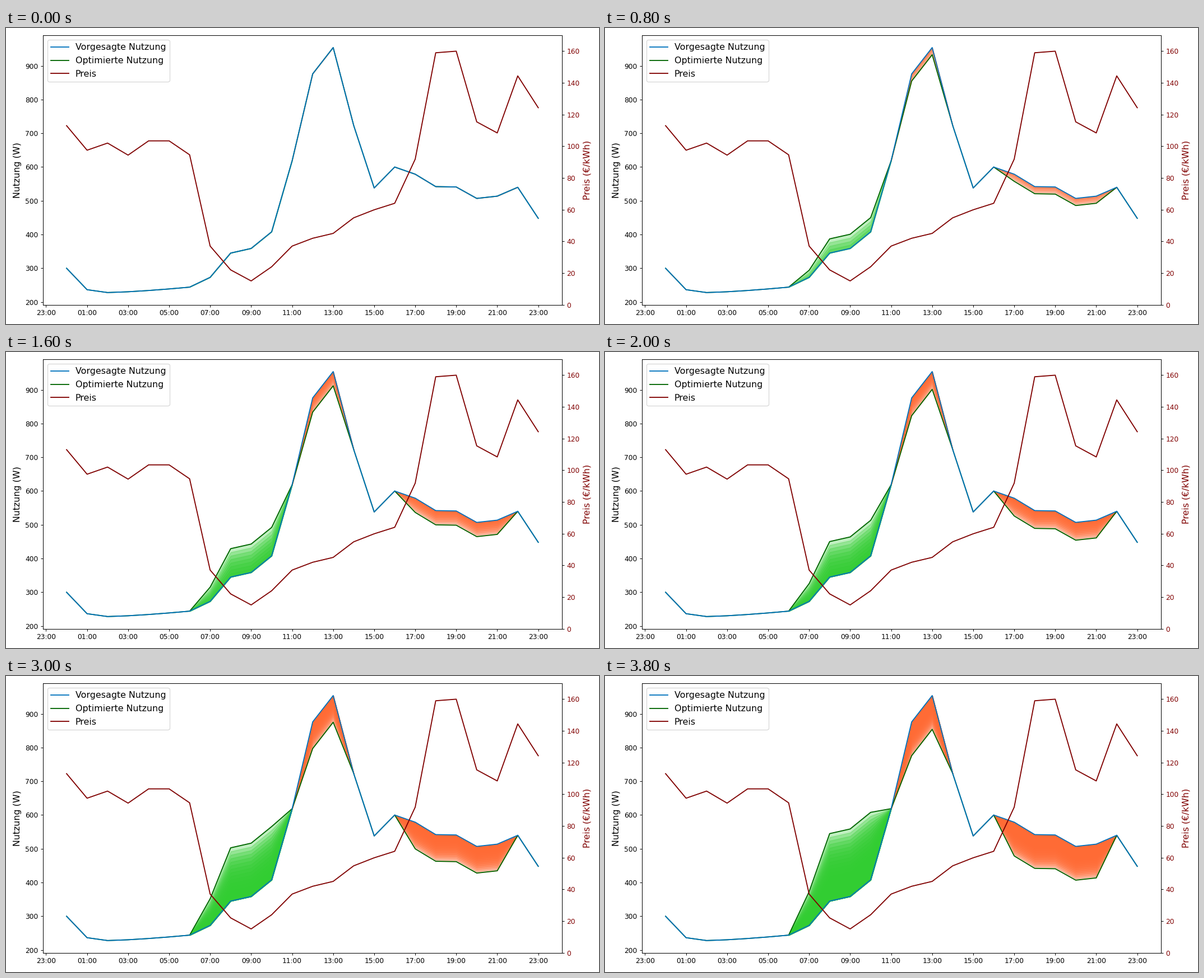
Animation, 1058 px wide and 529 px high, one loop 4 s. Source, as a matplotlib script:

```python
import numpy as np
import matplotlib.pyplot as plt
from matplotlib.animation import FuncAnimation

W, H = 1058, 529
FRAMES, INTERVAL = 20, 200
BLUE, GREEN, RED = "#0072bd", "darkgreen", "maroon"
RISE, FALL = "limegreen", "#ff6b35"

plt.rcParams["font.family"] = "DejaVu Sans"
hours = np.arange(24)


def day_curve(start, *keys):
    """Hourly values eased from key to key: (hour, value, bend)."""
    out = np.full(24, float(start))
    h0, v0 = 0, start
    for h1, v1, *bend in keys:
        u = np.linspace(0, 1, h1 - h0 + 1)
        out[h0:h1 + 1] = v0 + (v1 - v0) * u ** (bend[0] if bend else 1)
        h0, v0 = h1, v1
    return out


usage = day_curve(300, (2, 228, 0.18), (6, 244, 1.4), (8, 345, 1.8),
                  (10, 408, 2.2), (12, 876, 1.15), (13, 954),
                  (15, 538, 0.85), (16, 600), (18, 542, 1.45),
                  (20, 507, 5), (22, 540, 2.3), (23, 448))
price = day_curve(113, (1, 97.5), (2, 102), (3, 94.4), (4, 103.4),
                  (5, 103.4), (6, 94.6), (7, 37), (9, 15, 0.55),
                  (11, 37, 1.3), (13, 45, 0.7), (16, 64, 0.6),
                  (18, 159, 1.77), (19, 160), (21, 108.4, 0.21),
                  (22, 144.4), (23, 124.3))

# Load moved into the cheap morning, out of noon and evening:
# (first hour, last hour, watts, colour), ramping 100 W per hour
SHIFTS = [(6, 11, 200, RISE), (11, 14, -100, FALL), (16, 22, -100, FALL)]
shift = np.zeros(24)
for first, last, watts, _ in SHIFTS:
    inside = hours[first + 1:last]
    shift[inside] = np.sign(watts) * np.minimum(100 * (inside - first),
                                                abs(watts))


def optimised(k):
    return usage + shift * k / (FRAMES - 1)


fig, ax = plt.subplots(figsize=(12, 6), dpi=W / 12)
fig.subplots_adjust(left=66 / W, right=991.7 / W,
                    top=1 - 13.1 / H, bottom=1 - 494.5 / H)
ax_price = ax.twinx()

opt_line, = ax.plot(hours, usage, color=GREEN)
use_line, = ax.plot(hours, usage, color=BLUE)
price_line, = ax_price.plot(hours, price, color=RED)

# One translucent layer per step; they pile up into the gradient
layers = []
for k in range(FRAMES):
    opt = optimised(k)
    layers.append([
        ax.fill_between(hours[a:b + 1], usage[a:b + 1], opt[a:b + 1],
                        color=color, alpha=0.3)
        for a, b, _, color in SHIFTS
    ])

ax.set_xlim(-1.15, 24.15)
ax.set_ylim(192, 990.3)
ax_price.set_ylim(0, 170)
ticks = np.arange(-1, 24, 2)
ax.set_xticks(ticks, [f"{t % 24:02d}:00" for t in ticks])
ax.set_ylabel("Nutzung (W)", fontsize=13, labelpad=4.8)
ax_price.set_ylabel("Preis (€/kWh)", fontsize=13, color=RED, labelpad=4.8)
ax_price.tick_params(axis="y", labelcolor=RED)
ax.legend([use_line, opt_line, price_line],
          ["Vorgesagte Nutzung", "Optimierte Nutzung", "Preis"],
          loc="upper left", fontsize=13,
          labelspacing=0.55, handletextpad=0.72)


def update(k):
    opt_line.set_ydata(optimised(k))
    for i, fills in enumerate(layers):
        for fill in fills:
            fill.set_visible(i <= k)
    return [opt_line]


anim = FuncAnimation(fig, update, frames=FRAMES, interval=INTERVAL,
                     init_func=lambda: update(0), repeat=True,
                     repeat_delay=0, blit=False)
plt.show()
```
